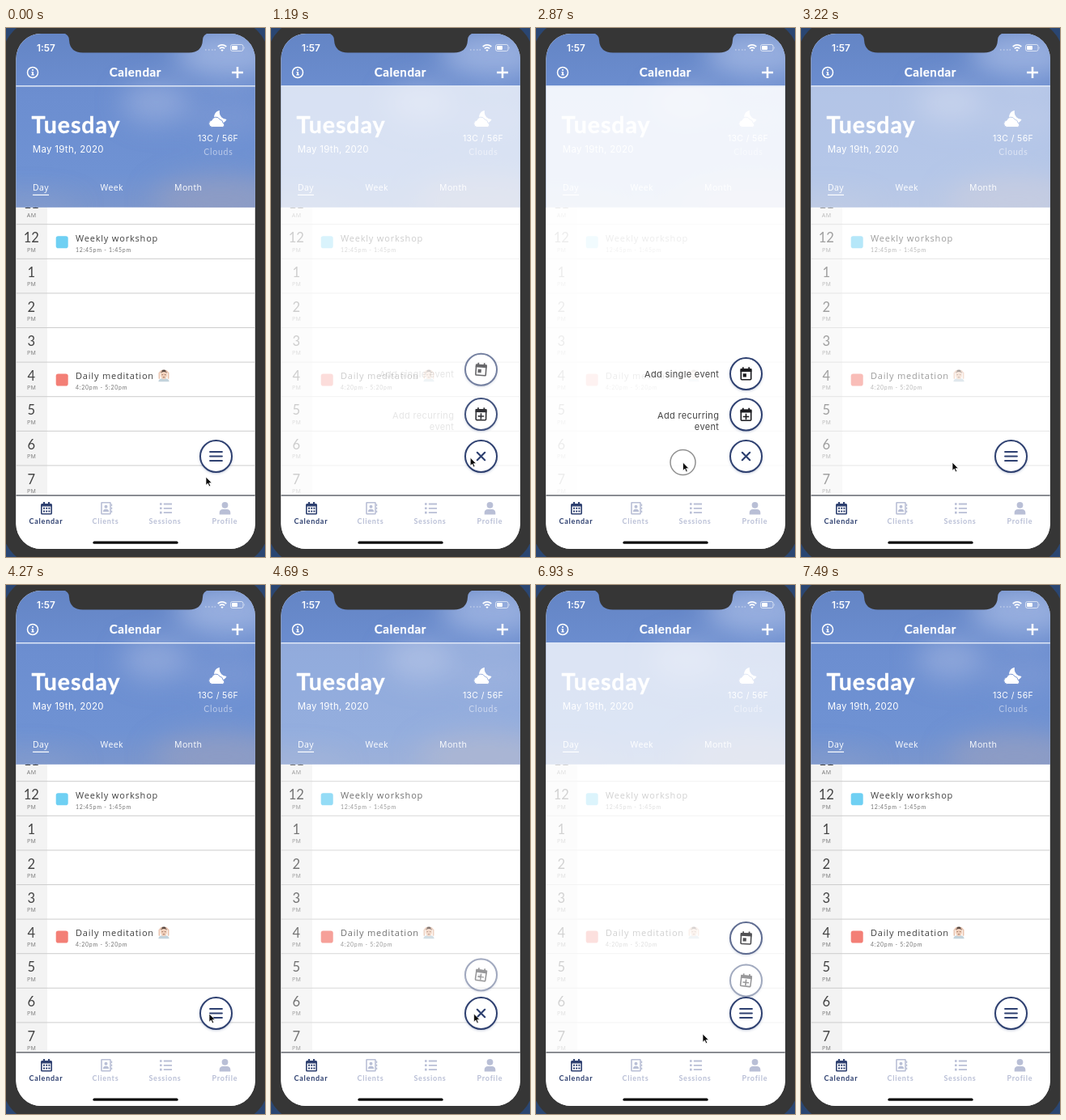
Write an HTML page that moves like this. It is 320 by 654 pixels and loops after 7560 ms.

```html
<!DOCTYPE html>
<html lang="en">
<head>
<meta charset="utf-8">
<title>Calendar menu</title>
<style>
html, body { margin: 0; width: 100%; height: 100%; overflow: hidden; background: #2a4672; }
svg { display: block; }
text { font-family: Lato, "Open Sans", sans-serif; }
.open { font-family: "Open Sans", "Noto Sans", sans-serif; }
.sys { font-family: Inter, Roboto, sans-serif; }
.mid { text-anchor: middle; }
.end { text-anchor: end; }
.tab { font-weight: 700; font-size: 9px; letter-spacing: .75px; }
.view { font-size: 10.5px; letter-spacing: .4px; }
.event { font-size: 11px; letter-spacing: .8px; fill: #404040; }
.time { font-size: 7px; letter-spacing: .72px; fill: #777; }
.label { font-size: 11px; letter-spacing: .35px; fill: #444; }
.fab { fill: #fff; stroke: #2e4070; stroke-width: 2; filter: drop-shadow(0 1.5px 1.5px rgba(70, 90, 140, .3)); }
</style>
</head>
<body>
<svg width="320" height="654" viewBox="0 0 320 654">
  <defs>
    <linearGradient id="sky" x1="0" y1="0" x2="0" y2="1">
      <stop offset="0" stop-color="#6485c5"/>
      <stop offset=".35" stop-color="#6c8ed0"/>
      <stop offset=".8" stop-color="#6f92d3"/>
      <stop offset="1" stop-color="#7b96cd"/>
    </linearGradient>
    <filter id="soft" x="-60%" y="-60%" width="220%" height="220%"><feGaussianBlur stdDeviation="16"/></filter>
    <clipPath id="screen"><rect x="12.4" y="7" width="295.400" height="637" rx="31"/></clipPath>
    <clipPath id="header"><rect x="12" y="7" width="296" height="214.700"/></clipPath>
    <g id="cal">
      <rect x="-6.2" y="-5.6" width="12.4" height="12.8" rx="1" fill="none" stroke="#1b1b1f" stroke-width="1.6"/>
      <path d="M-7-6.3H7V-2.4H-7ZM-4.6-8.2h1.8v3h-1.8ZM2.8-8.2h1.8v3H2.8Z" fill="#1b1b1f"/>
    </g>
  </defs>

  <rect x="-4" y="-9" width="328" height="672" rx="44" fill="#363636"/>

  <g clip-path="url(#screen)">
    <rect x="12" y="7" width="296" height="640" fill="#fff"/>
    <rect x="12" y="222" width="39" height="356" fill="#f3f3f3"/>
    <g id="hours"></g>

    <rect x="61.700" y="257.200" width="15" height="15" rx="2.800" fill="#6fd0f3"/>
    <text class="open event" x="86" y="264">Weekly workshop</text>
    <text class="time" x="86" y="276.5">12:45pm - 1:45pm</text>
    <rect x="61.700" y="427.500" width="15" height="15" rx="2.800" fill="#f37f76"/>
    <text class="open event" x="86" y="433.8">Daily meditation</text>
    <text class="time" x="86" y="446.8">4:20pm - 5:20pm</text>
    <g>
      <path d="M188.300 437.200q.5-4.200 6.700-4.200t6.700 4.200Z" fill="#c3d3dc"/>
      <ellipse cx="195" cy="429" rx="4" ry="5.200" fill="#f3d2bd"/>
      <path d="M191 426.800q0-4.400 4-4.400t4 4.400q-1.200-1.800-4-1.800t-4 1.800Z" fill="#5d4a42"/>
      <path d="M189.400 433v-6.500l2.600-2.700M200.600 433v-6.500l-2.600-2.700" fill="none" stroke="#e9c3ae" stroke-width="1.700" stroke-linecap="round"/>
      <path d="M192.500 428.700h1.700M195.800 428.700h1.700M193.800 431.800h2.400" stroke="#7d5547" stroke-width=".8"/>
    </g>

    <g clip-path="url(#header)">
      <rect x="12" y="7" width="296" height="215" fill="url(#sky)"/>
      <g filter="url(#soft)">
        <ellipse cx="275" cy="32" rx="65" ry="30" fill="#a9bce6" opacity=".75"/>
        <ellipse cx="185" cy="92" rx="42" ry="26" fill="#9fb2df" opacity=".65"/>
        <ellipse cx="275" cy="110" rx="50" ry="22" fill="#8ba3d8" opacity=".45"/>
        <ellipse cx="265" cy="212" rx="85" ry="30" fill="#959fc2" opacity=".75"/>
        <ellipse cx="30" cy="222" rx="60" ry="14" fill="#8ba1cd" opacity=".6"/>
      </g>
    </g>

    <g fill="#fff">
      <text x="31.500" y="130.300" font-size="28.500" font-weight="700" letter-spacing=".9" stroke="#fff" stroke-width=".4">Tuesday</text>
      <text class="sys" x="32.700" y="154" font-size="11.500" letter-spacing=".3">May 19th, 2020</text>
      <path d="M264 102A8 8 0 1 0 272.500 113A9 9 0 0 1 264 102Z"/>
      <path d="M254.500 122.500a4.300 4.300 0 0 1-.2-8.500a5.300 5.300 0 0 1 9.800-1a4.800 4.800 0 0 1 4 4.500a2.600 2.600 0 0 1-.6 5Z" stroke="#7d99d3"/>
      <text class="sys mid" x="262" y="140" font-size="10.500" letter-spacing=".35">13C / 56F</text>
      <text class="mid" x="262.400" y="156.600" font-size="10.500" letter-spacing=".8" fill="#bccbea">Clouds</text>
      <text class="open view" x="33" y="201">Day</text>
      <text class="open view" x="116.500" y="201">Week</text>
      <text class="open view" x="208" y="201">Month</text>
      <rect x="33" y="205.800" width="20" height="1.200"/>
    </g>

    <rect id="veil" x="12" y="72" width="296" height="506" fill="#fff"/>

    <rect x="12" y="71" width="296" height="1.500" fill="#dfe7f6"/>
    <g fill="#fff">
      <text class="sys" x="38" y="28.600" font-size="11.800" font-weight="600">1:57</text>
      <path d="M246 27h1.500M250 27h1.500M254 27h1.500M257.500 27h1.500" stroke="#fff" stroke-width="1.500" opacity=".4"/>
      <g fill="none" stroke="#fff" stroke-width="1.700">
        <path d="M261.700 23q5.300-4.400 10.600 0M263.800 25.400q3.200-2.500 6.400 0"/>
      </g>
      <path d="M265.300 27.200q1.700-1.200 3.400 0l-1.700 1.900Z"/>
      <rect x="277.500" y="20.500" width="15.500" height="8" rx="2.200" fill="none" stroke="#fff" stroke-opacity=".65"/>
      <rect x="279" y="22" width="7" height="5" rx="1"/>
      <path d="M294 23v3q1.300-1.500 0-3Z" opacity=".65"/>
      <circle cx="33" cy="55" r="6.500" fill="none" stroke="#fff" stroke-width="1.500"/>
      <circle cx="33" cy="52" r="1.100"/>
      <path d="M31.500 54h2.400v3.300h.9v1.300h-3.500v-1.300h.9v-2h-.7Z"/>
      <text class="mid" x="159.800" y="60.300" font-size="15" font-weight="700" letter-spacing=".6" stroke="#fff" stroke-width=".25">Calendar</text>
      <path d="M279 55h14M286 48v14" stroke="#fff" stroke-width="2.500"/>
    </g>

    <g id="menu"></g>

    <g>
      <circle class="fab" cx="259.500" cy="529.500" r="19.500"/>
      <g stroke="#2e4070" stroke-linecap="round">
        <path id="bars" d="M252 524h15M252 529.500h15M252 535h15" stroke-width="1.800"/>
        <path id="cross" d="M254.800 524.800l9.400 9.400M264.200 524.800l-9.400 9.400" stroke-width="2.200"/>
      </g>
    </g>

    <rect x="12" y="577" width="296" height="70" fill="#fff"/>
    <rect x="12" y="577" width="296" height="1.700" fill="#777a80"/>
    <g fill="#2e4070">
      <path fill-rule="evenodd" d="M43 589.500q0-1.500 1.500-1.500H46v-2h2v2h4v-2h2v2h1.500q1.500 0 1.500 1.500V600q0 1.500-1.500 1.500h-11Q43 601.500 43 600ZM44.600 591.500v8.500h10.800v-8.500Z"/>
      <path d="M46 593.800h8.500M46 597.500h8.500" stroke="#2e4070" stroke-width="2" stroke-dasharray="2 1.200"/>
      <text class="tab mid" x="49.400" y="613.300">Calendar</text>
    </g>
    <g fill="#b9bfd6">
      <path fill-rule="evenodd" d="M118.500 586h10q1.300 0 1.300 1.300v13q0 1.300-1.300 1.300h-10q-1.300 0-1.300-1.300v-13q0-1.300 1.300-1.300ZM118.800 587.600v12.400h9.400v-12.400Z"/>
      <circle cx="123.500" cy="591.700" r="2"/>
      <path d="M119.900 598q0-3.300 3.600-3.300t3.600 3.300ZM130 588.500h1.200v2.500H130ZM130 592.500h1.200v2.500H130ZM130 596.500h1.200v2.500H130Z"/>
      <path d="M190 588.500h2.600M190 593.800h2.600M190 599.100h2.600" stroke="#b9bfd6" stroke-width="2.600"/>
      <path d="M194.800 588.500H205M194.800 593.800H205M194.800 599.100H205" stroke="#b9bfd6" stroke-width="1.800"/>
      <circle cx="270.500" cy="589.800" r="3.900"/>
      <path d="M263.700 601.500v-2q0-4.500 4.500-4.500h4.600q4.500 0 4.500 4.500v2Z"/>
      <text class="tab mid" x="123" y="613.300">Clients</text>
      <text class="tab mid" x="196.500" y="613.300">Sessions</text>
      <text class="tab mid" x="270.400" y="613.300">Profile</text>
    </g>
    <path d="M109 636.200H211" stroke="#0c0c0c" stroke-width="3.200" stroke-linecap="round"/>
  </g>

  <path d="M70 6Q78 8 78 15Q79 30.500 95 30.500H226Q242 30.500 243 15Q243 8 251 6Z" fill="#363636"/>

  <circle id="ring" r="15.500" fill="none" stroke="#222" stroke-opacity=".5" stroke-width="1.500"/>
  <path id="cursor" d="M0 0V10.200L2.400 8L4 11.700L5.700 11L4.100 7.400H7.300Z" fill="#0a0a0a" stroke="#fff" stroke-width=".7"/>
</svg>

<script>
const LOOP = 7560, STEP = 70;
const OPENS = [[840, 2980], [4500, 6790]];
const CLICKS = [700, 2870, 4360, 6650];
const CLICK_LENGTH = 140;

// Pointer stops: time, x, y
const PATH = [
  [0, 247, 555], [420, 250, 531], [1050, 250, 531], [1680, 212, 532],
  [2450, 181.5, 537], [3010, 181.5, 537], [3220, 187, 537], [4270, 251, 530],
  [5250, 250, 530], [6050, 250, 530], [6550, 206, 555], [6930, 206, 555],
  [7420, 330, 640], [LOOP, 330, 640]
];

// Each item: resting height, opening delay, closing delay, closing length, closing curve
const ITEMS = [
  { y: 427.5, open: 150, close: 110, fade: 130, curve: 1.65, lines: ["Add single event"],
    mark: "M-3.8-.2h4.200v4.200h-4.200Z" },
  { y: 478, open: 80, close: 30, fade: 200, curve: 2.6, lines: ["Add recurring", "event"],
    mark: "M-3.8 1.700h3v-3H.8v3h3v1.600h-3v3H-.8v-3h-3Z" }
];
const FAB_Y = 529.5;

const $ = id => document.getElementById(id);
const clamp = v => Math.max(0, Math.min(1, v));
const inOut = v => v < .5 ? 2 * v * v : 1 - 2 * (1 - v) * (1 - v);
const outBack = v => 1 + 2.2 * (v - 1) ** 3 + 1.2 * (v - 1) ** 2;
const mix = (a, b, k) => a + (b - a) * k;

function buildHours() {
  $("hours").innerHTML = [11, 12, 1, 2, 3, 4, 5, 6, 7].map((hour, i) => {
    const y = 222.7 + i * 42.6;
    return `<rect x="12" y="${y + 19.5}" width="296" height="1" fill="#cdcdcd"/>
      <text class="mid" x="31.300" y="${y}" font-size="16.500" fill="#444">${hour}</text>
      <text class="open mid" x="31.600" y="${y + 11.2}" font-size="7" letter-spacing=".4" fill="#777">${i ? "PM" : "AM"}</text>`;
  }).join("");
}

function buildMenu() {
  $("menu").innerHTML = ITEMS.map((item, i) => `
    <g id="label${i}">${item.lines.map((line, n) =>
      `<text class="sys label end" x="226.300" y="${item.y + 4.7 + n * 14.5}">${line}</text>`).join("")}</g>
    <g id="item${i}"><circle class="fab" r="19.500"/>
      <g id="icon${i}"><use href="#cal"/><path d="${item.mark}" fill="#1b1b1f"/></g></g>`).join("");
}

function pointerAt(t) {
  const n = PATH.findIndex(p => p[0] > t);
  const a = PATH[n - 1], b = PATH[n];
  const k = inOut((t - a[0]) / (b[0] - a[0]));
  return [mix(a[1], b[1], k), mix(a[2], b[2], k)];
}

// Progress of the opening and of the closing that follows it
function phase(t, openDelay, openLength, closeDelay, closeLength) {
  const [start, stop] = t < OPENS[1][0] ? OPENS[0] : OPENS[1];
  return {
    up: clamp((t - start - openDelay) / openLength),
    down: clamp((t - stop - closeDelay) / closeLength)
  };
}

function draw(t) {
  const veil = phase(t, 0, 500, 0, 500);
  $("veil").setAttribute("opacity", .9 * (inOut(veil.up) - inOut(veil.down)));

  const swap = phase(t, 0, 120, 0, 120);
  const crossed = swap.up - swap.down;
  $("cross").setAttribute("opacity", crossed);
  $("bars").setAttribute("opacity", 1 - crossed);
  $("cross").setAttribute("transform", `rotate(${90 * (crossed - 1)} 259.5 529.5)`);

  ITEMS.forEach((item, i) => {
    const { up, down } = phase(t, item.open, 300, item.close, item.fade);
    const y = mix(FAB_Y, item.y, outBack(up) - down ** item.curve);
    $("item" + i).setAttribute("transform", `translate(259.5 ${y})`);
    $("item" + i).setAttribute("opacity", up * (1 - down));
    $("icon" + i).setAttribute("transform", `rotate(${12 * (1 - up + down)})`);
    const label = phase(t, 330, 150, 0, 100);
    $("label" + i).setAttribute("opacity", label.up * (1 - label.down));
  });

  const place = `translate(${pointerAt(t)})`;
  const pressed = CLICKS.some(c => t >= c && t < c + CLICK_LENGTH);
  $("cursor").setAttribute("transform", place);
  $("ring").setAttribute("transform", place);
  $("ring").setAttribute("visibility", pressed ? "visible" : "hidden");
}

buildHours();
buildMenu();
const begin = performance.now();
function tick() {
  const t = (performance.now() - begin) % LOOP;
  draw(Math.floor(t / STEP) * STEP);
  requestAnimationFrame(tick);
}
tick();
</script>
</body>
</html>
```
